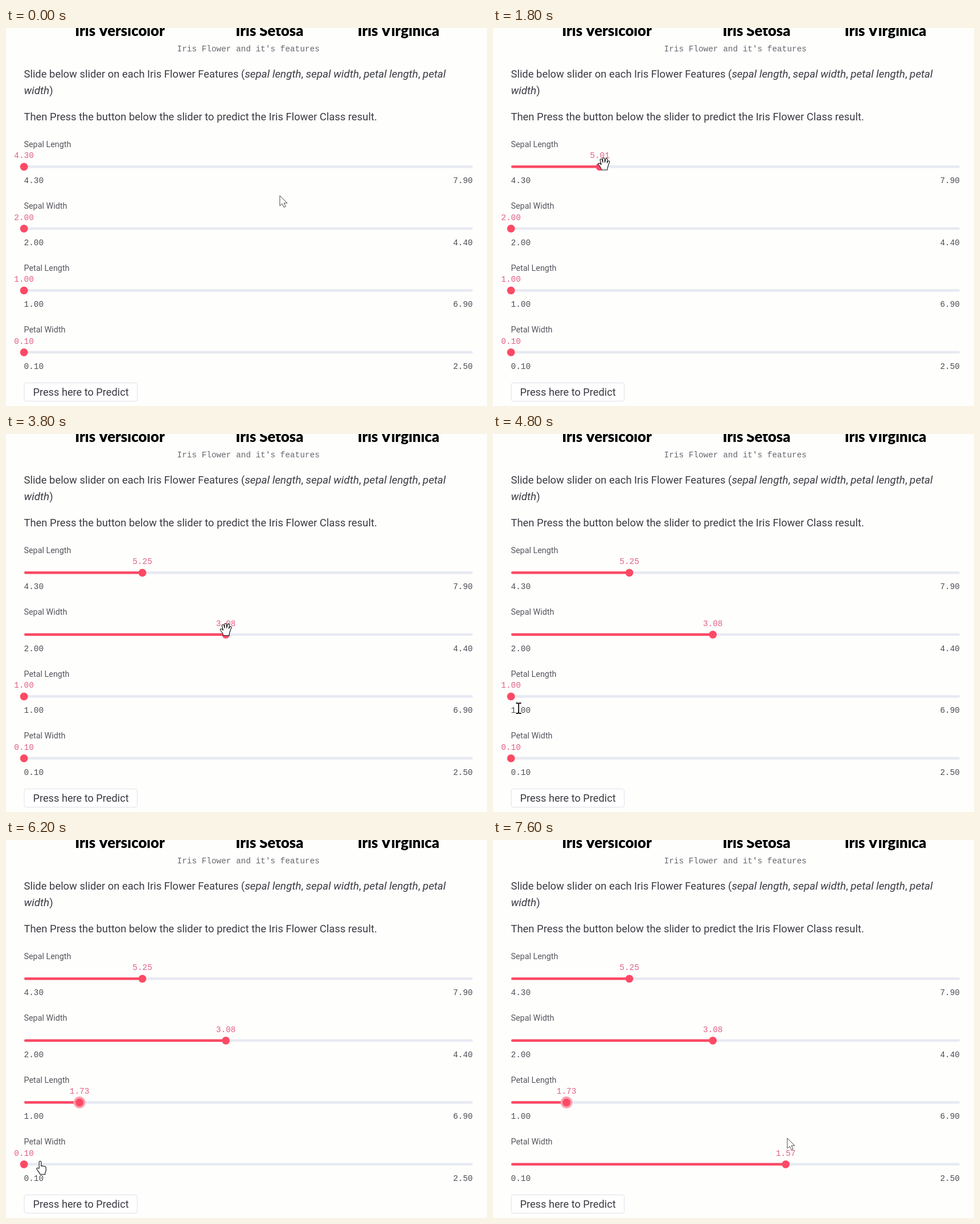
An HTML page that plays this animation: 845x663 px, repeating every 8 s.

```html
<!DOCTYPE html>
<html lang="en">
<head>
<meta charset="utf-8">
<title>Iris features</title>
<style>
  html, body { margin: 0; width: 100%; height: 100%; overflow: hidden; background: #fefefd; }
  svg { display: block; width: 845px; height: 663px; }
  text { font-family: Roboto, sans-serif; fill: #3a3b43; white-space: pre; }
  .title { font: 900 25.7px Lato, sans-serif; fill: #000; text-anchor: middle; }
  .body { font-size: 18.4px; }
  .body tspan { font-style: italic; font-size: 18.9px; }
  .label { font-size: 14.35px; fill: #55565d; }
  .mono { font: 14.4px "Liberation Mono", monospace; fill: #4d4e55; }
  .caption { fill: #66676d; }
  .value { fill: #e2608a; text-anchor: middle; }
  .end { text-anchor: end; }
  .button { font-size: 18.2px; }
  .cursor path { fill: #fff; stroke: #111; stroke-width: 1.1; stroke-linejoin: round; }
  .cursor #arrow { stroke: #333; stroke-width: .9; }
  .cursor #beam { fill: none; stroke-width: 1.8; }
</style>
</head>
<body>
<svg viewBox="0 0 845 663">
  <text class="title" x="200" y="14">Iris Versicolor</text>
  <text class="title" x="463" y="14">Iris Setosa</text>
  <text class="title" x="689.5" y="14">Iris Virginica</text>
  <text class="mono caption" x="300.5" y="41">Iris Flower and it's features</text>
  <text class="body" x="31.5" y="87">Slide below slider on each Iris Flower Features (<tspan>sepal length</tspan>, <tspan>sepal width</tspan>, <tspan>petal length</tspan>, <tspan>petal</tspan></text>
  <text class="body" x="31.5" y="115.5"><tspan>width</tspan>)</text>
  <text class="body" x="31.5" y="162">Then Press the button below the slider to predict the Iris Flower Class result.</text>
  <g id="sliders"></g>
  <rect x="32" y="622.5" width="198.5" height="32" rx="3.5" fill="#fff" stroke="#e1e2e7"/>
  <text class="button" x="47.5" y="645">Press here to Predict</text>
  <g class="cursor" id="cursor">
    <path id="arrow" d="M0 0V18L4.2 14.2L7.4 20.6L10.3 19.2L7.2 13.1H13Z"/>
    <path id="grab" d="M-4 10.5Q-5 6-9 1.5Q-10.5-.5-8.5-1.2Q-7-1.5-4.5 1L-6.5-6Q-7-8.3-5.3-8.7Q-3.7-9-3-7L-1.6-2.5L-2.2-9Q-2-10.8-.5-10.8Q1.1-10.8 1.3-9L1.8-2.8L3.2-8.5Q3.8-10.2 5.2-9.8Q6.7-9.3 6.4-7.5L5.5-1.8L7-4.5Q8-6 9.3-5.3Q10.4-4.5 9.8-3Q7.8 2 7 5Q6.2 8 6 10.5Z"/>
    <path id="point" d="M-1.8 13V2A1.8 1.8 0 0 1 1.8 2V9Q3.6 7.7 5.2 9.3Q7 8.4 8.2 9.9Q10.2 9.4 10.2 12V16.5Q10.2 18.5 8.7 20.5V23.5H0Q-1 20.5-3.5 18L-6 14Q-6.5 12-4.6 12.2Z"/>
    <path id="beam" d="M-4.5-9H-1.5L0-8L1.5-9H4.5M0-8V8M-4.5 9H-1.5L0 8L1.5 9H4.5"/>
  </g>
</svg>
<script>
const LOOP = 8000, STEP = 200;
const LEFT = 32, WIDTH = 788;
const RED = '#fc4a65';
const byId = id => document.getElementById(id);

// keys: [step, value]
const sliders = [
  { name: 'Sepal Length', min: 4.3, max: 7.9, keys: [[6, 4.3], [10, 5.25]] },
  { name: 'Sepal Width', min: 2, max: 4.4, keys: [[15, 2], [18, 2.97], [19, 3.08]] },
  { name: 'Petal Length', min: 1, max: 6.9, keys: [[25, 1], [27, 1.73]], ringFrom: 27 },
  { name: 'Petal Width', min: 0.1, max: 2.5, keys: [[33, 0.1], [36, 1.32], [37, 1.57]] },
];

// [step, x, y, shape]
const cursorKeys = [
  [0, 481, 294, 'arrow'], [4, 60, 232, 'arrow'],
  [5, 41, 240, 'grab'], [6, 41, 240, 'grab'], [10, 246, 238, 'grab'],
  [11, 150, 400, 'arrow'], [12, 40, 525, 'arrow'], [13, 30, 532, 'arrow'], [14, 35, 357, 'arrow'],
  [15, 35, 343, 'grab'], [18, 372, 343, 'grab'], [19, 386, 343, 'grab'], [20, 386, 343, 'grab'],
  [21, 200, 430, 'arrow'], [22, 20, 540, 'arrow'], [23, 4, 553, 'arrow'],
  [24, 45, 481, 'beam'],
  [25, 33, 452, 'grab'], [27, 130, 452, 'grab'], [28, 130, 452, 'grab'],
  [29, 100, 520, 'arrow'],
  [30, 45, 568, 'point'], [31, 60, 563, 'point'], [32, 40, 572, 'point'],
  [33, 32, 560, 'grab'], [36, 464, 560, 'grab'], [37, 515, 560, 'grab'],
  [38, 517, 523, 'arrow'],
];

function sample(keys, step, column = 1) {
  const next = keys.findIndex(key => key[0] > step);
  if (next < 0) return keys[keys.length - 1][column];
  if (next === 0) return keys[0][column];
  const a = keys[next - 1], b = keys[next];
  return a[column] + (b[column] - a[column]) * (step - a[0]) / (b[0] - a[0]);
}

function add(tag, attributes, content = '') {
  const node = document.createElementNS('http://www.w3.org/2000/svg', tag);
  for (const name in attributes) node.setAttribute(name, attributes[name]);
  node.textContent = content;
  return byId('sliders').appendChild(node);
}

sliders.forEach((s, i) => {
  const y = 243.3 + i * 108.5;
  const bar = { x: LEFT, y: y - 2.2, height: 4.4, rx: 2 };
  add('text', { class: 'label', x: 31.5, y: y - 34.5 }, s.name);
  add('rect', { ...bar, width: WIDTH, fill: '#e8eaf2' });
  s.fill = add('rect', { ...bar, fill: RED });
  s.ring = add('circle', { cy: y, r: 10.5, fill: '#fc9fb0' });
  s.thumb = add('circle', { cy: y, r: 6.9, fill: RED });
  s.value = add('text', { class: 'mono value', y: y - 15.2 });
  add('text', { class: 'mono', x: 31.5, y: y + 28.7 }, s.min.toFixed(2));
  add('text', { class: 'mono end', x: 820, y: y + 28.7 }, s.max.toFixed(2));
});

function draw(step) {
  for (const s of sliders) {
    const value = sample(s.keys, step);
    const length = WIDTH * (value - s.min) / (s.max - s.min);
    const x = LEFT - 0.4 + length;
    s.fill.setAttribute('width', length);
    s.ring.setAttribute('cx', x);
    s.ring.setAttribute('visibility', step >= s.ringFrom ? 'visible' : 'hidden');
    s.thumb.setAttribute('cx', x);
    s.value.setAttribute('x', x);
    s.value.textContent = value.toFixed(2);
  }
  const shape = cursorKeys.filter(key => key[0] <= step).pop()[3];
  for (const path of byId('cursor').children) {
    path.setAttribute('visibility', path.id === shape ? 'visible' : 'hidden');
  }
  byId('cursor').setAttribute('transform',
    `translate(${sample(cursorKeys, step, 1)} ${sample(cursorKeys, step, 2)})`);
}

function tick() {
  draw(Math.floor(performance.now() % LOOP / STEP));
  requestAnimationFrame(tick);
}
tick();
</script>
</body>
</html>
```
